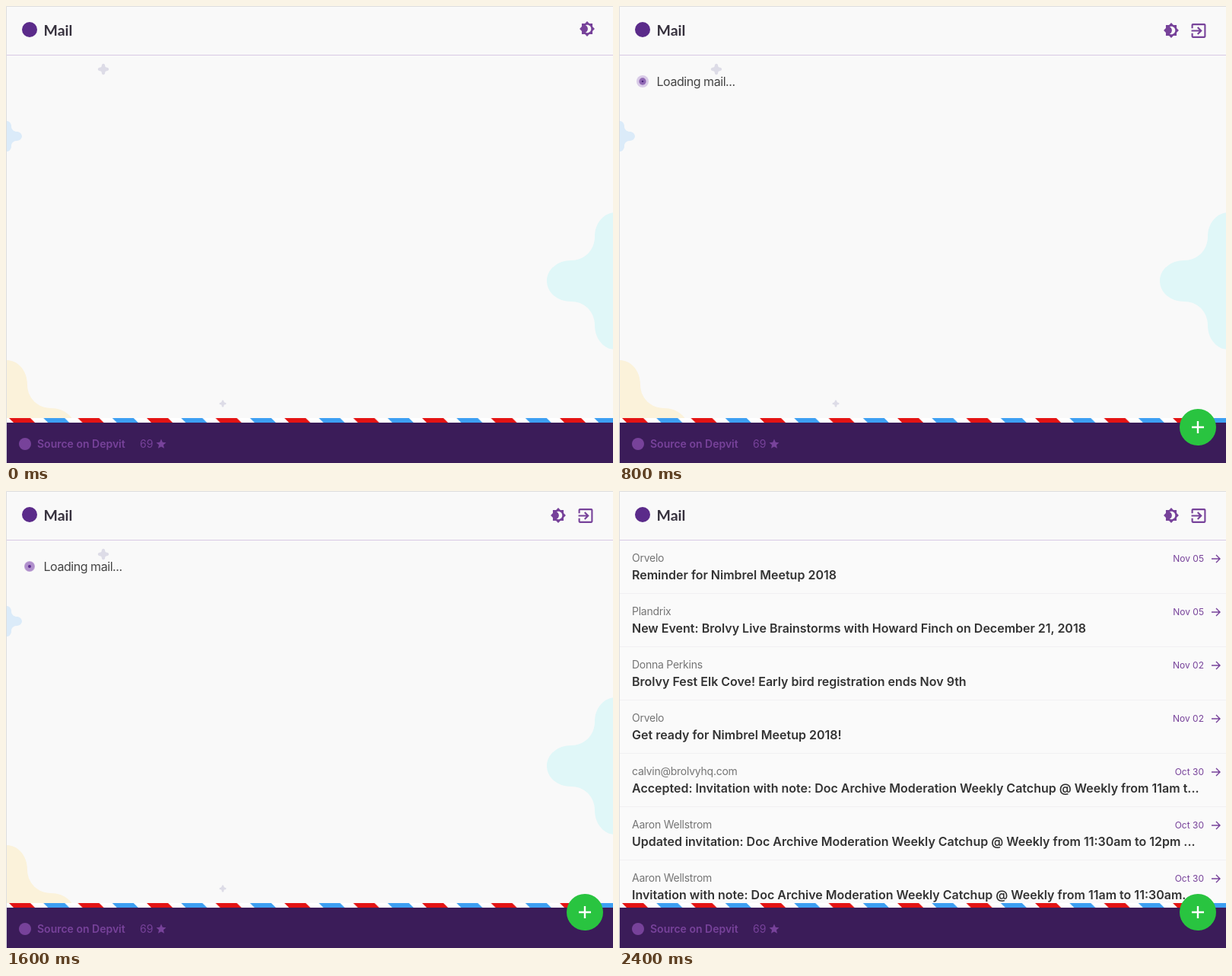
An HTML page that plays this animation: 798x600 px, repeating every 2990 ms.

```html
<!DOCTYPE html>
<html lang="en">
<head>
<meta charset="utf-8">
<title>Mail</title>
<style>
  html, body { margin: 0; width: 100%; height: 100%; overflow: hidden; background: #f9f9f9; }
  svg { display: block; width: 798px; height: 600px; }
  text { font-family: Inter, Roboto, sans-serif; white-space: pre; }
  .brand { font: 700 19.5px Lato, sans-serif; fill: #36313d; }
  .loading { font-size: 16px; letter-spacing: -.45px; fill: #444; }
  .sender { font-size: 14px; letter-spacing: -.25px; fill: #757575; }
  .subject { font-size: 16px; font-weight: 600; fill: #333; }
  .date { font-size: 12px; text-anchor: end; fill: #77429a; }
  .source { font-size: 14px; font-weight: 600; }
  .stars { font-size: 14px; }
  .accent { fill: #77429a; }
  .line { fill: none; stroke: #77429a; stroke-width: 1.4; }
</style>
</head>
<body>
<svg viewBox="0 0 798 600">
  <defs>
    <path id="blob" d="M-58-27C-40-27-27-41-27-58C-27-76-15-90 0-90S27-76 27-58C27-41 40-27 58-27C76-27 90-15 90 0S76 27 58 27C40 27 27 41 27 58C27 76 15 90 0 90S-27 76-27 58C-27 41-40 27-58 27C-76 27-90 15-90 0S-76-27-58-27Z"/>
    <pattern id="airmail" x="4" y="541" width="90.51" height="6" patternUnits="userSpaceOnUse">
      <path fill="#fff" d="M0 0H91V6H0Z"/>
      <path fill="#e31414" d="M0 0H28l6 6H6Z"/>
      <path fill="#3d9ff2" d="M45.25 0h28l6 6h-28Z"/>
    </pattern>
  </defs>

  <rect width="798" height="600" fill="#f9f9f9"/>
  <use href="#blob" fill="#dddce7" transform="translate(128 83) scale(.08)"/>
  <use href="#blob" fill="#dbebf9" transform="translate(1 171) scale(.222)"/>
  <use href="#blob" fill="#e0f7f8" transform="translate(801 361)"/>
  <use href="#blob" fill="#fbf2da" transform="translate(1 555)"/>
  <use href="#blob" fill="#dddce7" transform="translate(285 522) scale(.05)"/>

  <g id="loader">
    <circle cx="31" cy="99"/>
    <circle cx="31" cy="99"/>
    <circle cx="31" cy="99"/>
    <text class="loading" x="49.5" y="105">Loading mail...</text>
  </g>

  <g id="inbox">
    <rect x="1" y="65" width="797" height="476" fill="#fafafa"/>
    <g id="rows"></g>
    <rect id="scrollbar" x="795" y="68" width="4" height="126" rx="2" fill="#c3c3c3"/>
  </g>

  <rect y="64" width="798" height="1" fill="#d8cae5"/>
  <circle cx="31" cy="31" r="10" fill="#5b2b8a"/>
  <text class="brand" x="49.5" y="39">Mail</text>
  <path id="theme" class="accent" d="M20 8.69V4h-4.69L12 .69 8.69 4H4v4.69L.69 12 4 15.31V20h4.69L12 23.31 15.31 20H20v-4.69L23.31 12 20 8.69zM12 18c-.89 0-1.74-.2-2.5-.55C11.56 16.5 13 14.42 13 12s-1.44-4.5-3.5-5.45C10.26 6.2 11.11 6 12 6c3.31 0 6 2.69 6 6s-2.69 6-6 6z"/>

  <rect x="1" y="541" width="797" height="6" fill="url(#airmail)"/>
  <rect x="1" y="547" width="797" height="53" fill="#3b1c59"/>
  <g class="accent">
    <circle cx="25" cy="575" r="8"/>
    <text class="source" x="41" y="580">Source on Depvit</text>
    <text class="stars" x="176" y="580">69</text>
    <path transform="translate(196.2 567.2) scale(.65)" d="M12 17.27 18.18 21l-1.64-7.03L22 9.24l-7.19-.61L12 2 9.19 8.63 2 9.24l5.46 4.73L5.82 21z"/>
  </g>

  <g id="account">
    <path class="accent" transform="translate(749.4 19.9) scale(1.05)" d="M10.09 15.59 11.5 17l5-5-5-5-1.41 1.41L12.67 11H3v2h9.67l-2.58 2.59zM19 3H5c-1.11 0-2 .9-2 2v4h2V5h14v14H5v-4H3v4c0 1.1.89 2 2 2h14c1.1 0 2-.9 2-2V5c0-1.1-.9-2-2-2z"/>
    <circle cx="761" cy="553" r="24" fill="#29c440"/>
    <path d="M753 553h16M761 545v16" stroke="#fff" stroke-width="2.4"/>
  </g>

  <path fill="none" stroke="#dedede" d="M.5 600V.5H798"/>
</svg>

<script>
const LOOP = 2990, STEP = 200 / 3;
const SIGNED_IN = 600, LOADED = 1870, FADE_START = 1930, FADE_END = 2130;

const meeting = "Doc Archive Moderation Weekly Catchup @ Weekly from ";
const mails = [
  ["Orvelo", "Reminder for Nimbrel Meetup 2018", "Nov 05"],
  ["Plandrix", "New Event: Brolvy Live Brainstorms with Howard Finch on December 21, 2018", "Nov 05"],
  ["Donna Perkins", "Brolvy Fest Elk Cove! Early bird registration ends Nov 9th", "Nov 02"],
  ["Orvelo", "Get ready for Nimbrel Meetup 2018!", "Nov 02"],
  ["calvin@brolvyhq.com", `Accepted: Invitation with note: ${meeting}11am t...`, "Oct 30"],
  ["Aaron Wellstrom", `Updated invitation: ${meeting}11:30am to 12pm ...`, "Oct 30"],
  ["Aaron Wellstrom", `Invitation with note: ${meeting}11am to 11:30am...`, "Oct 30"]
];

// Spinner poses: time, then radius and colour of each disc
const poses = [
  [600, [8, 217, 203, 231], [4.4, 138, 93, 174], [0, 75, 38, 125]],
  [1000, [8, 217, 203, 231], [4.9, 150, 114, 186], [2.6, 72, 35, 122]],
  [1400, [8, 214, 197, 228], [6.7, 170, 134, 200], [2.1, 88, 42, 138]],
  [1800, [6.1, 183, 154, 208], [6, 181, 151, 207], [2, 98, 48, 148]]
];

const $ = id => document.getElementById(id);
const show = (el, on) => { el.style.display = on ? "" : "none"; };
const clamp = x => Math.min(1, Math.max(0, x));

$("rows").innerHTML = mails.map(([sender, subject, date], i) => `
  <g transform="translate(0 ${65 + 70 * i})">
    <text class="sender" x="17" y="28">${sender}</text>
    <text class="subject" x="17" y="51">${subject}</text>
    <text class="date" x="769" y="28">${date}</text>
    <path class="line" d="M779 24H790M785 19l5 5-5 5"/>
    <rect x="1" y="69" width="797" height="1" fill="#f1f0f2"/>
  </g>`).join("");

const discs = $("loader").querySelectorAll("circle");

function drawSpinner(t) {
  const i = t < 1000 ? 0 : t < 1400 ? 1 : 2;
  const [from, to] = [poses[i], poses[i + 1]];
  const k = clamp((t - from[0]) / (to[0] - from[0]));
  discs.forEach((disc, n) => {
    const [r, ...rgb] = from[n + 1].map((v, j) => v + (to[n + 1][j] - v) * k);
    disc.setAttribute("r", r);
    disc.setAttribute("fill", `rgb(${rgb.map(Math.round)})`);
  });
}

function draw() {
  const t = performance.now() % LOOP;
  const stepped = Math.floor((t + 4) / STEP) * STEP;
  const signedIn = t >= SIGNED_IN, loaded = t >= LOADED;
  const [x, y] = signedIn ? [726, 32] : [764, 30];

  $("theme").setAttribute("transform", `translate(${x} ${y}) scale(.88) translate(-12 -12)`);
  show($("account"), signedIn);
  show($("loader"), signedIn && !loaded);
  show($("inbox"), loaded);
  drawSpinner(stepped);
  $("scrollbar").setAttribute("opacity", clamp((FADE_END - stepped) / (FADE_END - FADE_START)));
  requestAnimationFrame(draw);
}
draw();
</script>
</body>
</html>
```
